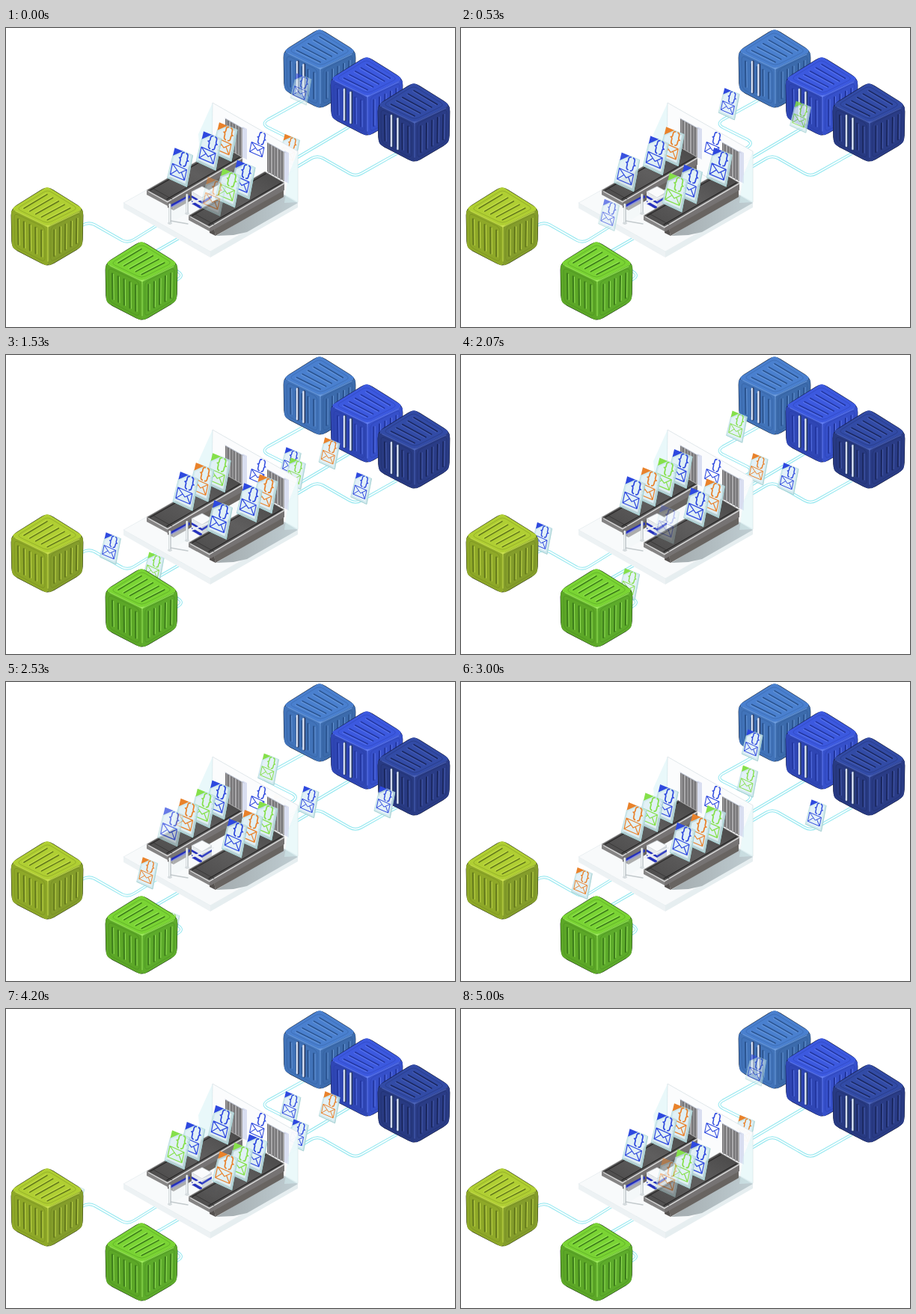
Recreate the animation shown at these times as an HTML page. Size 600 by 400 pixels, loop 5.07 s.

```html
<!DOCTYPE html>
<html lang="en">
<head>
<meta charset="utf-8">
<title>Message sorting line</title>
<style>
  html, body { margin: 0; width: 100%; height: 100%; overflow: hidden; background: #fff; }
  svg { display: block; width: 600px; height: 400px; }
</style>
</head>
<body>
<svg id="stage" viewBox="0 0 600 400" xmlns="http://www.w3.org/2000/svg">
  <defs>
    <g id="mail" fill="none" stroke="currentColor" stroke-width="1.2" stroke-linejoin="round">
      <path d="M-10-5L9 3.500L6 17.500L-13 9.500ZM-10-5L-1 8L9 3.500M-13 9.500L-4 4M6 17.500L2 7"/>
      <g transform="matrix(1 .4 -.25 1 5 -10)" stroke-width="1.6">
        <path id="brace" d="M-1-9q-3 0-3 3v3q0 2.500-2 2.500q2 0 2 2.500v3q0 3 3 3"/>
        <use href="#brace" transform="scale(-1 1)"/>
      </g>
    </g>
    <g id="card">
      <path d="M4-21.500L17-16L9 26L-17 14L-9.500-16Z" fill="#cbe7ec" fill-opacity=".85" stroke="#b4dadd" stroke-width=".8"/>
      <path d="M4-19L14-14.500L7 22L-14 12.500L-8-14Z" fill="#e4f2f8" fill-opacity=".9"/>
      <path d="M17-16L9 26L-17 14" fill="none" stroke="#a9d2d4" stroke-width="1.1"/>
      <path d="M-7-26L4-21.500L-9.500-15.500Z" fill="currentColor"/>
      <use href="#mail"/>
    </g>
    <linearGradient id="belt" x1="0" y1="1" x2="1" y2="0">
      <stop offset="0" stop-color="#4b4a4a"/><stop offset=".5" stop-color="#5f5e5e"/><stop offset="1" stop-color="#484747"/>
    </linearGradient>
    <linearGradient id="shade" x1="0" y1="0" x2="1" y2="0">
      <stop offset="0" stop-color="#a3abae"/><stop offset="1" stop-color="#bfcdd2"/>
    </linearGradient>
  </defs>
  <g id="lines" fill="none"></g>
  <g id="sources"></g>
  <g id="inputs"></g>
  <g id="machine"></g>
  <g id="back"></g>
  <g id="front"></g>
  <g id="outputs"></g>
  <g id="targets"></g>
</svg>
<script>
const NS = 'http://www.w3.org/2000/svg';
const LOOP = 5070, CYCLE = 5000, STEP = 1000 / 15;
const INK = { blue: '#2e49df', orange: '#e9822b', green: '#85e04a' };
const $ = id => document.getElementById(id);
const poly = (pts, fill, extra = '') => `<polygon points="${pts}" fill="${fill}" ${extra}/>`;
const line = (d, color, w, extra = '') =>
  `<path d="${d}" fill="none" stroke="${color}" stroke-width="${w}" stroke-linecap="round" ${extra}/>`;

// Closed path with softened corners.
function softPath(pts, r) {
  const toward = (a, b) => {
    const k = r / Math.hypot(b[0] - a[0], b[1] - a[1]);
    return [a[0] + (b[0] - a[0]) * k, a[1] + (b[1] - a[1]) * k];
  };
  return pts.map((p, i) => {
    const n = pts.length;
    const a = toward(p, pts[(i + n - 1) % n]), b = toward(p, pts[(i + 1) % n]);
    return `${i ? 'L' : 'M'}${a}Q${p} ${b}`;
  }).join('') + 'Z';
}

// Point on a four-cornered face, u across and v along.
const onFace = ([a, b, c, d]) => (u, v) => [0, 1].map(i =>
  (a[i] * (1 - u) + b[i] * u) * (1 - v) + (d[i] * (1 - u) + c[i] * u) * v);

function face(corners, fill, dark, light, width) {
  const at = onFace(corners);
  let out = `<path d="${softPath(corners, 5)}" fill="${fill}"/>`;
  out += `<path d="${softPath([at(.08, .07), at(.92, .07), at(.92, .93), at(.08, .93)], 6)}" fill="none" stroke="${dark}" stroke-opacity=".35"/>`;
  for (let u = .18; u < .83; u += .16) {
    out += line(`M${at(u, .18)}L${at(u, .83)}`, dark, width);
    out += line(`M${at(u + .035, .18)}L${at(u + .035, .83)}`, light, .9);
  }
  return out;
}

function cube(x, y, [top, left, right, dark, light, edge], isSource) {
  const T = [47, -1], L = [-1, 29], C = [48, 52], R = [95, 29], B = [48, 106], LB = [0, 81], RB = [94, 79];
  let out = `<g transform="translate(${x} ${y})">`;
  out += `<path d="${softPath([T, R, RB, B, LB, L], 9)}" fill="${light}" stroke="${edge}" stroke-width="1.1"/>`;
  out += face([L, C, B, LB], left, dark, light, 2.2);
  out += face([C, R, RB, B], right, dark, light, 2.2);
  out += face(isSource ? [T, L, C, R] : [R, T, L, C], top, dark, light, 1.5);
  out += line('M5 32L44 51Q48 54 52 51L90 33M48 55V99', light, 1.2, 'stroke-opacity=".8"');
  if (isSource) for (const [rx, ry] of [[17, 43], [25.5, 47]]) {
    out += line(`M${rx + 1} ${ry}v41`, '#26375f', 3.4);
    out += line(`M${rx} ${ry}v41`, '#a9b9d6', 2.5);
    out += line(`M${rx - .4} ${ry}v41`, '#f1f5ff', 1.2);
  }
  return out + '</g>';
}

$('sources').innerHTML =
  cube(372, 2, ['#4a80cf', '#4173b9', '#3c6bac', '#2b5490', '#6c9bdc', '#1c2a40'], true) +
  cube(435, 39, ['#3c59df', '#2f46b4', '#3650ca', '#2337a0', '#5f7bf0', '#141d48'], true) +
  cube(498, 74, ['#324ba6', '#283a82', '#2a3c86', '#1b2860', '#4c63b8', '#11183a'], true);
$('targets').innerHTML =
  cube(8, 213, ['#b0cf33', '#8ea828', '#849d2b', '#647a1c', '#c9e04f', '#303a12']) +
  cube(134, 286, ['#7ad434', '#5ca727', '#5dab2b', '#3d7d1b', '#9be95c', '#1d3a12']);

function conveyor(x, y) {
  return `<g transform="translate(${x} ${y})">` +
    poly('34,18 127,-37 127,-25 36,27', '#686461') +
    poly('28,18 34,17 36,27 28,23', '#55514f') +
    poly('0,0 28,16 28,21 0,6', '#858484') +
    poly('28,16 128,-43 128,-34 28,22', '#767373') +
    poly('0,0 102,-59 128,-44 28,15', 'url(#belt)', 'stroke="#b5b5b5" stroke-width=".8"') +
    line('M5 0L103 -56M27 12L124 -44', '#282727', 1.2) +
    line('M28 15.500L128 -43', '#d2d2d2', 1.3) +
    line('M3 2L28 16', '#d2d2d2', 1.1) +
    line('M9 -2L34 12', '#353434', .8) + '</g>';
}

function door(x, y) {
  let out = `<g transform="translate(${x} ${y})">`;
  out += poly('0,0 23,13 23,52 0,39', '#777678');
  for (let i = 0; i < 6; i++)
    out += line(`M${2 + i * 4} ${2 + i * 2.26}v38`, i % 2 ? '#a9a8aa' : '#949395', 2);
  out += poly('23,11 29,14 29,55 23,52', '#d9def0');
  out += line('M0 0L25 14', '#c0c7d6', 1);
  return out + '</g>';
}

function post(x, y, h) {
  return line(`M${x} ${y}v${h}`, '#aeb6bb', 3.2) + line(`M${x - .4} ${y}v${h}`, '#f4f7f8', 1.8) +
    `<ellipse cx="${x}" cy="${y + h}" rx="3" ry="1.6" fill="#d5dbde"/>`;
}

$('machine').innerHTML =
  poly('157,234 273,299 273,307 157,241', '#edf2f4') +
  poly('273,299 390,232 390,240 273,307', '#e6eef0') +
  poly('157,234 275,168 390,232 273,299', '#f8fafb', 'stroke="#e6edef" stroke-width=".8"') +
  poly('276,100 390,165 390,233 275,170', '#fbfcfd', 'fill-opacity=".96" stroke="#dde5e8" stroke-width=".9"') +
  poly('276,100 257,142 260,178 276,170', '#d8f3f6', 'fill-opacity=".55"') +
  door(293, 121) + door(349, 153) +
  `<use href="#mail" transform="translate(337 157) scale(.88)" color="${INK.blue}"/>` +
  poly('281,278 371,223 390,234 322,273 304,277', 'url(#shade)') +
  conveyor(188, 217) +
  line('M221 238L244 226', '#2430bd', 4) +
  poly('248,219 262,212 275,219 262,227', '#fafbfc', 'stroke="#cbd1d5" stroke-width=".8"') +
  poly('248,219 262,227 262,244 248,236', '#e7eaed') +
  poly('262,227 275,219 275,236 262,244', '#cfd4d8') +
  poly('248,224 262,232 262,235 248,227', '#2632bd') +
  poly('248,231 262,239 262,243 248,235', '#2632bd') +
  poly('262,232 275,224 275,227 262,235', '#3643c4') +
  conveyor(244, 251) +
  poly('219,240 242,227 242,248 219,261', '#f0f6f8', 'fill-opacity=".5"') +
  line('M220 258L243 262', '#c3cacd', 1.4) +
  post(219, 236, 25) + post(242, 223, 25) +
  line('M246 235L277 222', '#eef1f3', 2) +
  poly('390,165 377,198 372,234 390,233', '#d8f3f6', 'fill-opacity=".45"');

// Routes: geometry, px per ms, fades in ms; trips are [colour, start].
const routes = [
  { layer: 'inputs', track: true, speed: .077, fadeIn: 100, fadeOut: 150,
    d: 'M398 96L350 122.5Q341 128 350 133L383 149.500Q391 154 383 159.500L350 178',
    trips: [['blue', 2867], ['blue', 4940], ['green', 1627]] },
  { layer: 'inputs', track: true, speed: .078, fadeIn: 100, fadeOut: 150,
    d: 'M459 132L360 190.500',
    trips: [['green', 450], ['orange', 1130], ['orange', 3800]] },
  { layer: 'inputs', track: true, speed: .078, fadeIn: 100, fadeOut: 150,
    d: 'M522 168L475 194.500Q467 199 459 194.500L424 174.500Q416 170 408 174.500L370 197',
    trips: [['blue', 835], ['blue', 2295]] },
  { layer: 'back', speed: .0234, fadeIn: 60, fadeOut: 450, d: 'M294 151L213 197.400',
    trips: [['orange', 4900], ['green', 1000], ['blue', 1970], ['blue', 3870]] },
  { layer: 'front', speed: .023, fadeIn: 250, fadeOut: 500, d: 'M352 182L272 227.800',
    trips: [['blue', 194], ['orange', 1230], ['green', 2220], ['blue', 3194]] },
  { layer: 'outputs', track: true, speed: .066, fadeIn: 200, fadeOut: 350,
    d: 'M205 262L171 283Q163 288 155 284L118 263Q110 259 102 264L76 279',
    trips: [['blue', 400], ['orange', 2240]] },
  { layer: 'outputs', track: true, speed: .071, fadeIn: 150, fadeOut: 250,
    d: 'M240 276L200 299Q192 304 200 309L230 326Q238 331 230 336L205 349',
    trips: [['green', 830]] }
];

function make(tag, attrs, parent) {
  const el = document.createElementNS(NS, tag);
  for (const key in attrs) el.setAttribute(key, attrs[key]);
  parent.append(el);
  return el;
}

for (const r of routes) {
  r.path = make('path', { d: r.d, fill: 'none' }, $('lines'));
  if (r.track) {
    r.path.setAttribute('stroke', '#8fe6ee');
    r.path.setAttribute('stroke-width', 3.8);
    make('path', { d: r.d, stroke: '#f6feff', 'stroke-width': 2 }, $('lines'));
  }
  r.span = r.path.getTotalLength() / r.speed;
  r.cards = r.trips.map(([color, start]) => ({
    start, el: make('use', { href: '#card', color: INK[color] }, $(r.layer))
  }));
}

const clamp = v => Math.max(0, Math.min(1, v));

function draw(time) {
  for (const r of routes) {
    for (const c of r.cards) c.age = (time - c.start + CYCLE) % CYCLE;
    // Cards further along stand nearer to the viewer.
    r.cards.sort((a, b) => a.age - b.age);
    for (const { age, el } of r.cards) {
      const shown = age < r.span;
      el.style.display = shown ? '' : 'none';
      if (!shown) continue;
      const p = r.path.getPointAtLength(age * r.speed);
      const place = `translate(${p.x} ${p.y - (r.track ? 16.5 : 0)})`;
      el.setAttribute('transform', r.track ? place + ' scale(.82)' : place);
      el.setAttribute('opacity', Math.min(clamp(age / r.fadeIn), clamp((r.span - age) / r.fadeOut)));
      $(r.layer).append(el);
    }
  }
}

const begin = performance.now();
let last = -1;
function tick() {
  const step = Math.floor(((performance.now() - begin) % LOOP + 3.4) / STEP);
  if (step !== last) draw(Math.min(step, 75) * STEP % CYCLE);
  last = step;
  requestAnimationFrame(tick);
}
tick();
</script>
</body>
</html>
```
